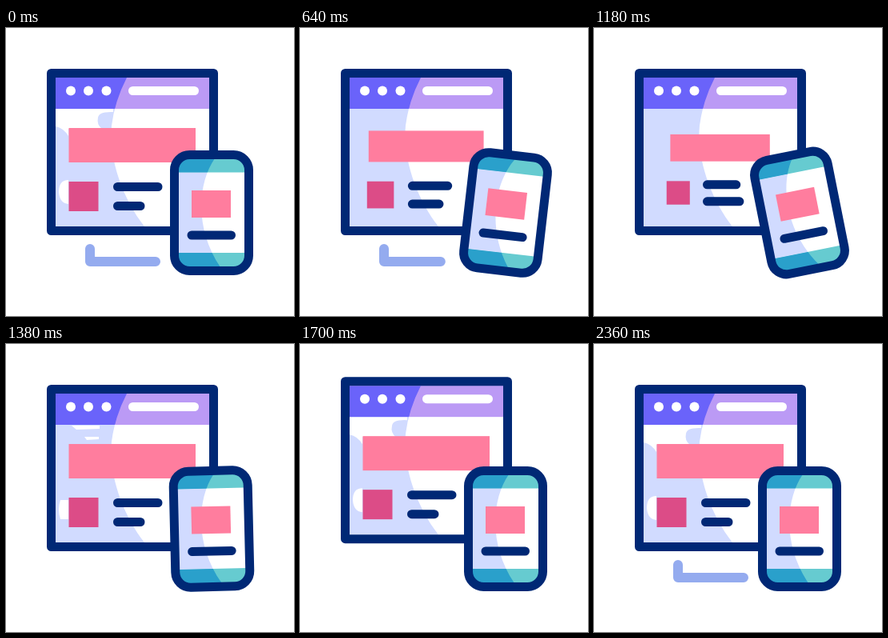
An HTML page that plays this animation: 360x360 px, repeating every 2400 ms.

```html
<!DOCTYPE html>
<html>
<head>
<meta charset="utf-8">
<style>
html, body { margin: 0; width: 100%; height: 100%; overflow: hidden; background: #fff; }
svg { display: block; width: 100vw; height: 100vh; }
.ink { fill: none; stroke: #002875; stroke-width: 11; stroke-linecap: round; stroke-linejoin: round; }
.pink { fill: #ff7d9e; }
.white { fill: #fff; }
.shade { fill: #d1dbff; }
</style>
</head>
<body>
<svg viewBox="0 0 360 360">
  <defs>
    <clipPath id="pane"><path d="M62 62H151Q136 91 132 122C128 165 147 215 173 248H62Z"/></clipPath>
    <clipPath id="screen"><rect x="215" y="163" width="84" height="136" rx="14"/></clipPath>
    <clipPath id="glare"><path d="M215 163H261C240 193 235 250 268 299H215Z"/></clipPath>
  </defs>

  <path id="stand" d="M105 276V292H187" fill="none" stroke-width="12" stroke-linecap="round" stroke-linejoin="round"/>

  <g id="win">
    <rect class="white" x="57" y="57" width="202" height="196"/>
    <rect x="61" y="61" width="194" height="40" fill="#bb9af5"/>
    <g clip-path="url(#pane)">
      <rect class="shade" x="61" y="100" width="120" height="149"/>
      <g class="white">
        <path id="wide" d="M62 101H134V105Q116 104 115 112Q113 121 120 126H78V135Q72 125 62 123ZM78 190Q66 190 66 205Q67 219 78 220Z"/>
        <path id="mid" d="M62 101H134V104Q108 105 108 113Q108 121 120 126H78V122L72 124L68 113L62 108ZM78 191Q65 194 66 207Q68 220 78 221Z"/>
        <path id="slim" d="M82 102H117V106L88 107ZM98 116H116V119L101 120ZM78 195H68Q64 207 68 219H78Z"/>
      </g>
      <rect x="61" y="61" width="120" height="40" fill="#6a63fa"/>
    </g>
    <g class="white">
      <circle cx="81" cy="78.5" r="6"/>
      <circle cx="103" cy="78.5" r="6"/>
      <circle cx="125.5" cy="78.5" r="6"/>
      <rect x="153" y="73" width="88" height="11" rx="5.5"/>
    </g>
    <rect id="banner" class="pink"/>
    <rect id="tile" fill="#dc4c87"/>
    <path id="lines" class="ink"/>
    <rect class="ink" x="56.5" y="56.5" width="203" height="197"/>
  </g>

  <g id="phone">
    <rect class="white" x="210.5" y="158.5" width="93" height="145" rx="19"/>
    <g clip-path="url(#screen)">
      <path d="M215 163H299V180.500H215ZM215 281H299V299H215Z" fill="#66cbd0"/>
      <g clip-path="url(#glare)">
        <rect class="shade" x="215" y="180.500" width="60" height="100.500"/>
        <path d="M215 163H299V180.500H215ZM215 281H299V299H215Z" fill="#2aa0cb"/>
      </g>
    </g>
    <rect class="pink" x="232" y="203" width="49" height="34"/>
    <path class="ink" d="M232 259H281.500"/>
    <rect class="ink" x="210.500" y="158.500" width="93" height="145" rx="19"/>
  </g>
</svg>
<script>
const LOOP = 2400;
const el = id => document.getElementById(id);
const set = (id, attrs) => {
  for (const k in attrs) el(id).setAttribute(k, attrs[k]);
};
const ramp = (t, a, b) => Math.min(1, Math.max(0, (t - a) / (b - a)));
const ease = p => p * p * (3 - 2 * p);
const swing = (t, a, b) => Math.sin(Math.PI * ramp(t, a, b));
const hop = (t, a, b) => swing(t, a, b) ** 2;
const mix = (a, b, u) => a + (b - a) * u;

// Boxes are [left, top, right, bottom]
function box(id, from, to, u) {
  const [x, y, r, b] = from.map((v, i) => mix(v, to[i], u));
  set(id, { x, y, width: r - x, height: b - y });
}

function draw(t) {
  const squeeze = ease(ramp(t, 500, 900)) - ease(ramp(t, 1060, 1370));
  box('banner', [78.5, 125, 237, 168], [104, 137, 211, 166], squeeze);
  box('tile', [78.5, 192, 115.5, 229], [97, 191, 122, 216.5], squeeze);
  const m = (a, b) => mix(a, b, squeeze);
  const left = m(139.5, 142.5);
  set('lines', {
    d: `M${left} ${m(198.5, 194.5)}H${m(190, 171.5)}M${left} ${m(222.5, 214)}H${m(168, 189)}`
  });

  set('win', { transform: `translate(0 ${-27 * hop(t, 1428, 1772)})` });
  const lift = -23.5 * hop(t, 220, 540);
  const tilt = 8.5 * swing(t, 540, 900) - 11.5 * swing(t, 900, 1400);
  set('phone', { transform: `translate(0 ${lift}) rotate(${tilt} 257 231)` });

  const erased = ramp(t, 600, 960);
  const shown = t < 1400 ? 1 - erased : ease(ramp(t, 1800, 2200));
  const fade = t < 1400 ? ramp(erased, 0.4, 0.8) : 0;
  const rgb = [148, 171, 239].map((v, i) => mix(v, [186, 168, 232][i], fade));
  set('stand', {
    stroke: `rgb(${rgb})`,
    'stroke-dasharray': `${98 * shown} 200`,
    visibility: shown > 0.01 ? 'visible' : 'hidden'
  });

  // White wear marks over the tinted pane
  const wear = t < 300 || t >= 1620 ? 'wide' : t < 560 ? 'mid' : t >= 1300 ? 'slim' : '';
  for (const id of ['wide', 'mid', 'slim']) {
    set(id, { visibility: id === wear ? 'visible' : 'hidden' });
  }
}

const start = performance.now();
function tick() {
  draw((performance.now() - start) % LOOP);
  requestAnimationFrame(tick);
}
tick();
</script>
</body>
</html>
```
